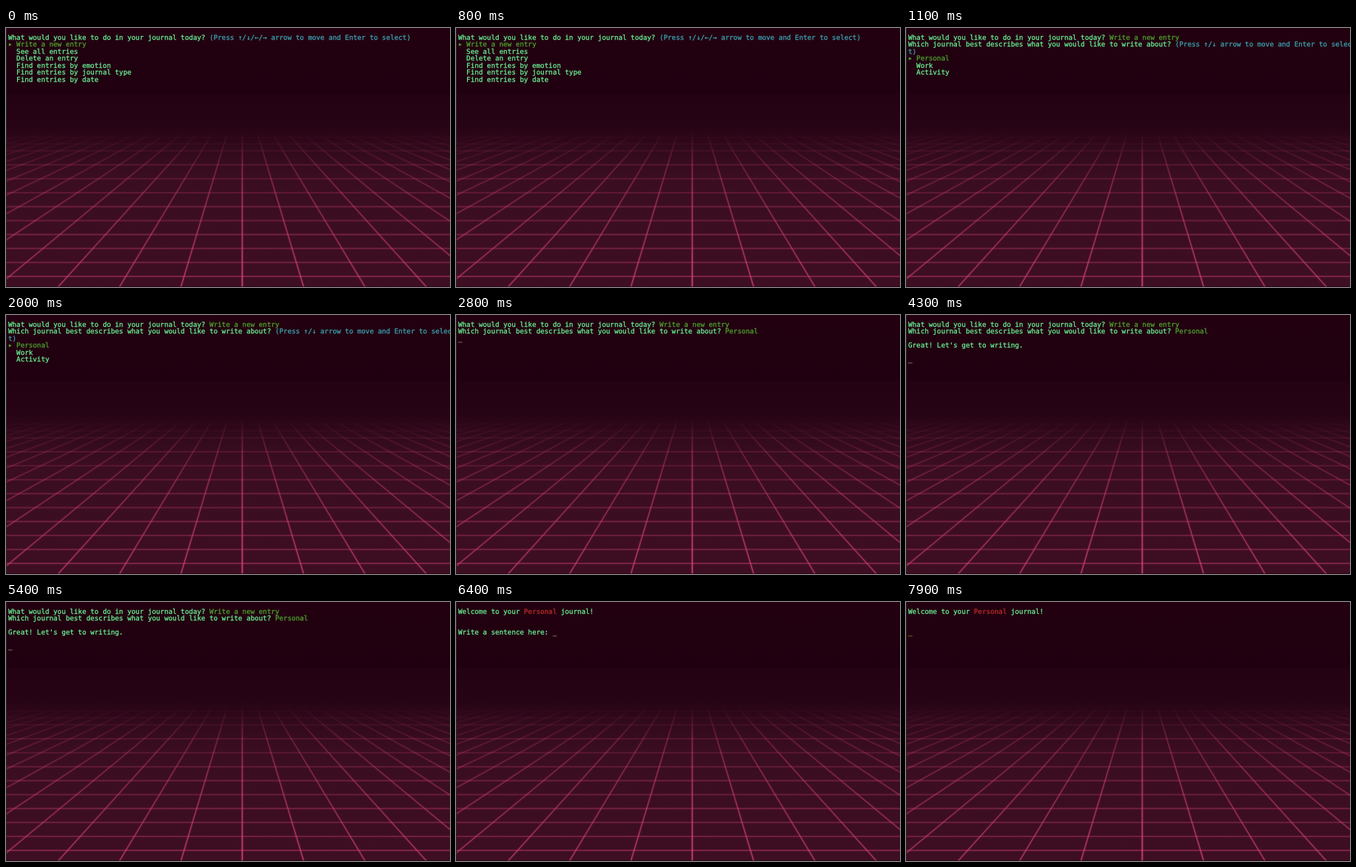
Recreate the animation shown at these times as an HTML page with a canvas. Size 600 px wide and 351 px high, loop 8000 ms.

```html
<!DOCTYPE html>
<html lang="en">
<head>
<meta charset="utf-8">
<title>Journal</title>
<style>
html, body { margin: 0; width: 100%; height: 100%; overflow: hidden; background: #22000f; }
canvas { position: absolute; left: 0; top: 0; }
pre {
  position: absolute; left: 3px; top: 9px; margin: 0;
  font: 9.22px/9.42px "DejaVu Sans Mono", monospace;
  text-rendering: geometricPrecision;
  color: #6cf598; -webkit-text-stroke: .25px;
}
i { font-style: normal; }
.pick { color: #4fa52e; }
.hint { color: #3ea5b4; }
.name { color: #bd2c27; }
.cursor { color: #9a8a80; }
.olive { color: #96842c; }
</style>
</head>
<body>
<canvas id="stage" width="600" height="351"></canvas>
<pre id="term"></pre>
<script>
const LOOP = 8000, W = 600, H = 351;
const ctx = document.getElementById('stage').getContext('2d');
const term = document.getElementById('term');

function gradient(stops) {
  const g = ctx.createLinearGradient(0, 0, 0, H);
  for (const [y, color] of stops) g.addColorStop(y / H, color);
  return g;
}

// A soft wide pass under a thin bright one gives the neon look.
function glowLine(x1, y1, x2, y2, width, alpha) {
  for (const [w, a] of [[width + 2, .2], [width, .9]]) {
    ctx.globalAlpha = a * alpha;
    ctx.lineWidth = w;
    ctx.beginPath();
    ctx.moveTo(x1, y1);
    ctx.lineTo(x2, y2);
    ctx.stroke();
  }
}

function drawGrid() {
  ctx.fillStyle = gradient([
    [0, '#220010'], [89, '#200010'], [90, '#240213'], [135, '#270415'],
    [165, '#320a1c'], [200, '#3a0d20'], [H, '#3e0e22']
  ]);
  ctx.fillRect(0, 0, W, H);

  const neon = alpha => `rgba(208,62,118,${alpha})`;
  ctx.strokeStyle = gradient([
    [140, neon(0)], [160, neon(.16)], [185, neon(.4)],
    [225, neon(.62)], [290, neon(.8)], [H, neon(1)]
  ]);
  const cx = 319.3, horizon = 75, start = 140;
  const shrink = (start - horizon) / (H - horizon);
  for (let i = -16; i <= 16; i++) {
    const dx = i * 83;
    glowLine(cx + dx * shrink, start, cx + dx, H, i ? 1.3 : 1.7, 1 / (1 + .09 * Math.abs(i)));
  }
  for (let i = 0; i < 10; i++) {
    const y = 166.5 + i * 18.9;
    glowLine(0, y, W, y, 1.1, .58);
  }
  for (const y of [148, 157]) glowLine(0, y, W, y, 1, .5);
  ctx.globalAlpha = 1;
  ctx.fillStyle = '#29202a';
  ctx.fillRect(0, 0, 1, H);
  ctx.fillStyle = 'rgba(25,0,12,.6)';
  ctx.fillRect(0, H - 1, W, 1);
}

const span = (cls, text) => `<i class="${cls}">${text}</i>`;
const menu = ([first, ...rest]) =>
  [span('pick', '▸ ' + first), ...rest.map(item => '  ' + item)].join('\n');

const ask = 'What would you like to do in your journal today? ';
const which = 'Which journal best describes what you would like to write about? ';
const cursor = span('cursor', '_');
const asked = ask + span('pick', 'Write a new entry') + '\n';
const chosen = asked + which + span('pick', 'Personal') + '\n';
const welcome = `Welcome to your ${span('name', 'Personal')} journal!\n\n\n`;

const screens = [
  [0, ask + span('hint', '(Press ↑/↓/←/→ arrow to move and Enter to select)') + '\n' + menu([
    'Write a new entry', 'See all entries', 'Delete an entry', 'Find entries by emotion',
    'Find entries by journal type', 'Find entries by date'])],
  [1000, asked + which + span('hint', '(Press ↑/↓ arrow to move and Enter to selec\nt)') + '\n' +
    menu(['Personal', 'Work', 'Activity'])],
  [2300, chosen + cursor],
  [3200, chosen + "\nGreat! Let's get to writing.\n\n" + cursor],
  [5800, welcome + 'Write a sentence here: ' + cursor],
  [7600, welcome + span('olive', '_')]
];

let shown;
function frame(now) {
  const t = now % LOOP;
  const screen = screens.findLast(([start]) => t >= start);
  if (screen !== shown) {
    shown = screen;
    term.innerHTML = screen[1];
  }
  requestAnimationFrame(frame);
}

drawGrid();
frame(0);
</script>
</body>
</html>
```
